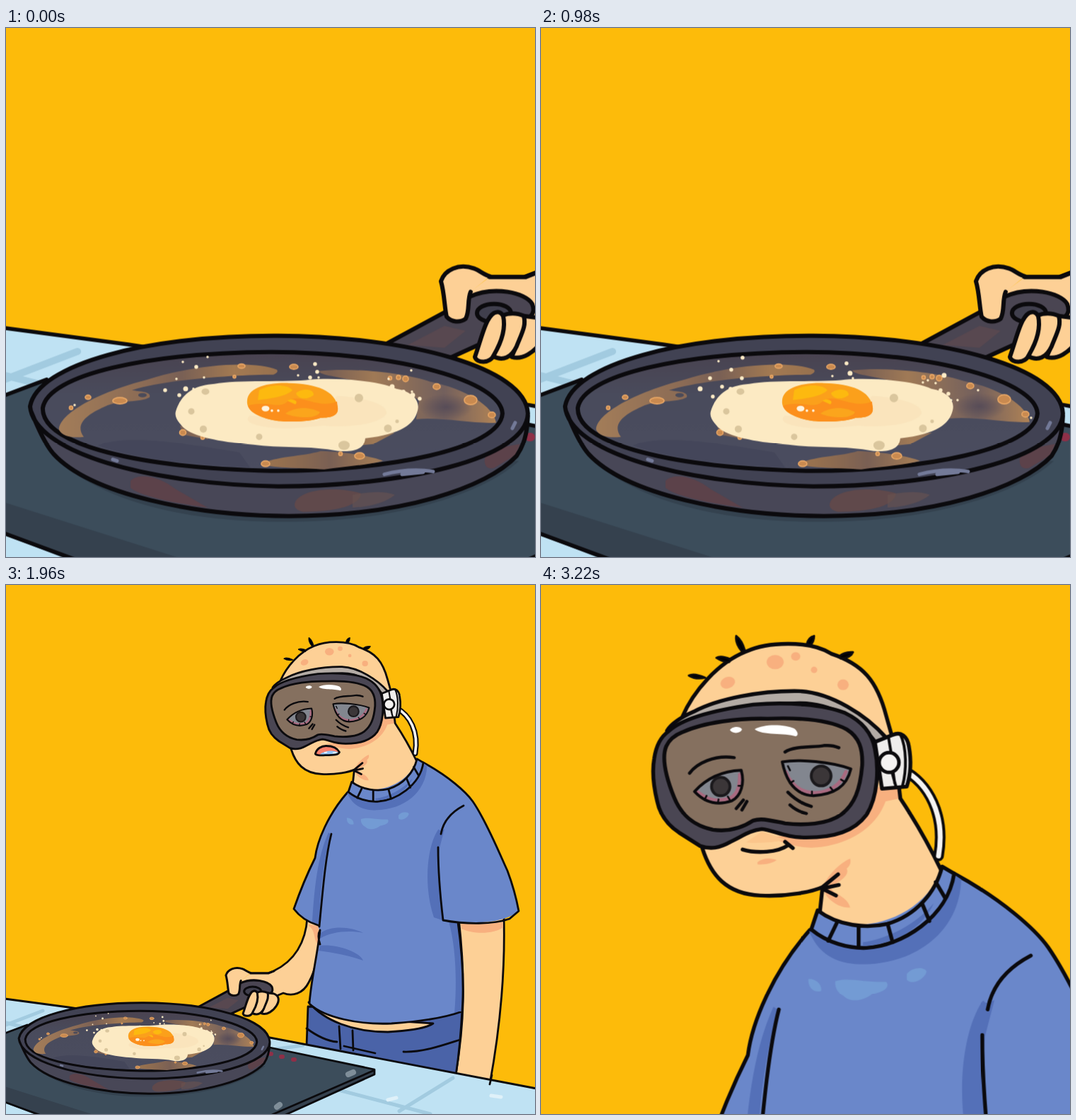
An HTML page for the animation above (4340 ms loop, 748 by 748 pixels).

```html
<!DOCTYPE html>
<html lang="en">
<head>
<meta charset="utf-8">
<title>Frying an egg in goggles</title>
<style>
@property --boil { syntax: "<number>"; inherits: true; initial-value: 0; }
@property --look { syntax: "<number>"; inherits: true; initial-value: 0; }
@property --smile { syntax: "<number>"; inherits: true; initial-value: 0; }
html, body { margin: 0; width: 100%; height: 100%; overflow: hidden; background: #fdbb0a; }
svg { display: block; width: 100vw; height: 100vh; }
path, ellipse, circle { stroke-linecap: round; stroke-linejoin: round; }

/* camera: pan, whole room, face */
#world { animation: camera 4340ms step-end infinite, boil 4340ms step-end infinite,
  look 4340ms step-end infinite, smile 4340ms step-end infinite; }
@keyframes camera {
  0% { transform: matrix(1.984, 0, 0, 1.984, -2, -737); }
  32.258% { transform: none; }
  64.516%, 100% { transform: matrix(1.905, 0, 0, 1.905, -540, -70.4); }
}
@keyframes boil {
  0%, 6.451%, 12.903%, 19.354%, 25.806%, 32.258%, 45.161% { --boil: 0; }
  3.225%, 9.677%, 16.129%, 22.58%, 29.032%, 35.483%, 58.064%, 100% { --boil: 1; }
}
@keyframes look { 0% { --look: 0; } 45.161%, 100% { --look: 1; } }
@keyframes smile { 0% { --smile: 0; } 74.193%, 100% { --smile: 1; } }

#pan { transform: translate(1px, 371.5px) scale(.504); }
#face { transform: translate(283.5px, 36.95px) scale(.525); }
.boilA { opacity: calc(1 - var(--boil)); }
.boilB { opacity: var(--boil); }
.talk { opacity: calc(1 - var(--smile)); }
.grin { opacity: var(--smile); }
.oilL { transform: translate(calc(var(--boil) * 3px), 0); }
.oilR { transform: translate(calc(var(--boil) * -2px), calc(var(--boil) * -1px)); }
.eyeL { transform: translate(calc((var(--look) - 1) * 8px), calc((1 - var(--look)) * 1px)); }
.eyeR { transform: translate(calc((var(--look) - 1) * 13px), calc((1 - var(--look)) * 1px)); }

.ink { stroke: #0b0a0d; }
.line { stroke: #0b0a0d; fill: none; }
.skin { fill: #fdd096; }
.blush { fill: #f8b07f; }
.shirt { fill: #6a87ca; }
.shade { fill: #5470b8; }
.steel { fill: #484757; }
.oil { fill: url(#oilFill); }
.ring { fill: #c98a50; stroke: #eaa866; stroke-width: 1.6; }
.spark { fill: none; stroke: #fdebc6; }
</style>
</head>
<body>
<svg viewBox="0 0 748 748" preserveAspectRatio="none">
<defs>
  <linearGradient id="oilFill" gradientUnits="userSpaceOnUse" x1="75" x2="693" y1="0" y2="0">
    <stop offset="0" stop-color="#a37d59"/><stop offset=".2" stop-color="#8b6b55"/>
    <stop offset=".28" stop-color="#796055"/><stop offset=".4" stop-color="#a37a52"/>
    <stop offset=".5" stop-color="#97714f"/><stop offset=".62" stop-color="#7a6054"/>
    <stop offset=".72" stop-color="#a07a56"/><stop offset=".88" stop-color="#73605d"/>
    <stop offset="1" stop-color="#b08356"/>
  </linearGradient>
  <radialGradient id="haze"><stop stop-color="#584d58"/><stop offset="1" stop-color="#584d58" stop-opacity="0"/></radialGradient>
  <linearGradient id="wall" x1="0" x2="0" y1="0" y2="1">
    <stop offset="0" stop-color="#4a4350"/><stop offset=".35" stop-color="#494b5c"/><stop offset="1" stop-color="#4b4d60"/>
  </linearGradient>
</defs>
<path fill="#fdbb0a" d="M0 0H748V748H0Z"/>
<g id="world">

  <!-- body -->
  <g stroke-width="2.8">
    <path class="skin ink" d="M640 470H704C706 550 698 630 684 706L636 692C648 620 650 560 640 470Z"/>
    <path class="blush" d="M643 477H703V484C690 494 660 494 644 486Z"/>
    <path class="skin ink" d="M345 549H370L378 546C408 532 424 505 426 470L446 470C443 520 438 545 428 562C420 578 405 582 392 577L380 582"/>
    <path class="blush" d="M428 480L442 482 441 508C434 500 438 488 428 482Z"/>
    <path class="ink" fill="#4a63a8" d="M427 596L425 652 636 694C641 660 643 640 645 600Z"/>
    <path class="skin ink" d="M428 590C450 616 490 632 540 632C575 630 595 626 604 620L545 616Z"/>
    <path class="line" d="M471 624L473 656M490 630L491 658M425 627C440 638 455 645 468 646M478 652L522 662M562 660C590 661 620 650 642 643"/>
    <path class="shirt" d="M483 293C455 325 440 362 437 386C425 410 415 435 407 458C416 470 428 477 441 481L444 492C441 520 431 560 429 592C450 612 500 622 545 620C590 617 620 612 645 603C648 560 645 520 639 477C680 479 705 475 725 462C722 445 715 420 709 404C700 385 680 335 660 306C650 292 625 270 590 251Z"/>
    <path class="shade" d="M456 350C440 385 436 430 433 477L443 482C444 430 449 390 459 352ZM620 345C610 350 614 344 611 346C595 370 590 425 605 470L620 475C613 440 611 400 613 372ZM626 476C636 510 638 560 634 606L645 603C648 560 645 520 639 477ZM444 493C460 480 490 484 505 492C485 488 460 490 444 500ZM444 510C465 507 500 518 505 531C485 524 465 520 442 517Z"/>
    <path class="line" d="M483 293C455 325 440 362 437 386C425 410 415 435 407 458C416 470 428 477 441 481M444 488C441 520 431 560 429 592C450 612 500 622 545 620C590 617 620 612 645 603C648 560 645 520 639 477M590 251C625 270 650 292 660 306C680 335 700 385 709 404C715 420 722 445 725 461L712 472C690 480 650 480 618 474C614 440 611 400 611 371M647 312C628 322 618 335 615 352M460 352C452 383 448 430 443 483M444 488C440 495 442 502 444 508"/>
  </g>

  <!-- head -->
  <g id="face" stroke-width="5.4">
    <path class="shade" d="M379 489C395 530 430 537 460 536C530 534 592 490 594 416L582 408C570 480 460 530 379 489Z"/>
    <path fill="#739bd4" d="M378 557C388 556 398 565 396 574C386 577 377 570 378 557ZM416 560C435 554 455 562 488 561C494 568 485 576 468 578C455 589 436 590 428 581C420 577 415 570 416 560ZM517 550C524 540 542 539 545 546C544 556 525 567 517 558Z"/>
    <path class="skin" d="M199 190C215 150 250 110 290 94C320 80 380 78 410 97C455 112 475 135 488 185L508 300C530 335 552 375 566 402C540 475 440 500 394 464L396 428C385 433 350 441 310 439C262 437 240 410 228 370Z"/>
    <path class="blush" d="M322 357C345 364 362 373 390 371C440 366 475 340 487 306L506 302 504 286 476 286 440 346ZM437 387C422 393 404 412 398 428L404 440C415 452 425 456 437 456C435 446 425 440 414 434L408 426C428 418 436 408 432 401C438 396 438 391 437 387Z"/>
    <g class="blush">
      <ellipse cx="331" cy="109" rx="12" ry="10"/><ellipse cx="360" cy="101" rx="6.5" ry="6"/>
      <circle cx="386" cy="120" r="4.5"/><ellipse cx="427" cy="141" rx="8" ry="7.5"/>
      <ellipse cx="264" cy="138" rx="10.5" ry="8" transform="rotate(-20 264 138)"/>
    </g>
    <path class="line" d="M199 188C215 150 250 110 290 94C320 80 380 78 410 97C455 112 475 135 488 185L495 210M506 285L508 302C530 335 552 375 565 402M228 372C240 410 262 437 310 439C350 441 385 433 398 427L394 464M398 427L420 409M398 429L421 424M399 430L417 439"/>
    <path class="ink" stroke-width="3" d="M232 131Q216 124 209 128Q219 134 232 131ZM268 105Q254 99 248 103Q257 109 266 109ZM284 94Q274 82 276 72Q284 78 288 92ZM376 83Q378 74 386 72Q386 80 381 85ZM421 101Q429 94 441 95Q438 103 424 104Z"/>
    <path class="ink" fill="#b3aba5" d="M178 206C185 195 200 186 216 179C250 161 310 149 365 150C410 152 460 184 488 216L474 224C450 190 410 167 365 167C300 168 230 182 178 206Z"/>
    <path class="line" stroke-width="15" d="M511 261C548 280 572 325 562 383"/>
    <path fill="none" stroke="#f5f3f2" stroke-width="7" d="M511 261C548 280 572 325 562 383"/>
    <path class="ink" fill="#efedec" d="M472 222L497 212C509 206 518 215 520 228C524 250 522 270 517 285L482 288Z"/>
    <path class="line" stroke-width="4" d="M491 214L495 238M496 264L502 286M508 211C517 230 517 262 511 284M498 266L500 280"/>
    <path class="ink" fill="#4a4653" d="M180 207C200 188 250 176 300 169C350 165 400 169 430 181C455 193 468 210 472 232C478 260 476 300 460 325C443 348 415 357 375 357C345 357 330 347 312 345C295 347 285 355 268 363C252 372 240 374 225 369L195 350C180 340 168 325 164 305C158 280 157 262 160 245C163 225 170 214 180 207Z"/>
    <path class="ink" fill="#85705f" d="M200 208C230 194 280 188 320 189C370 187 410 192 432 204C450 215 455 232 454 255C451 290 443 310 425 324C405 339 370 340 345 337C325 333 312 329 300 333C285 343 265 349 243 346C215 340 198 325 188 300C178 275 170 245 177 228C182 217 190 212 200 208Z"/>
    <circle class="ink" cx="492" cy="251" r="14" fill="#f5f3f2" stroke-width="5"/>
    <path fill="#fff" d="M267 205C270 200 281 199 284 204C283 210 270 211 267 205ZM302 204C315 196 345 197 358 203C364 208 364 213 360 214C345 209 312 213 302 204Z"/>
    <path class="line" stroke-width="4.5" d="M210 266C220 252 245 240 273 244M345 236C358 227 385 230 400 227Q412 226 421 230M276 316L286 304M284 318L291 306M349 293Q364 308 382 313M352 311Q362 320 375 323"/>
    <path fill="#82868f" d="M217 292C235 272 258 263 283 262C288 280 283 298 270 305C250 312 232 308 217 292ZM341 250C365 246 410 250 438 260C432 285 415 296 385 298C365 297 348 285 341 250Z"/>
    <path fill="none" stroke="#a96a80" stroke-width="5" d="M222 293C238 306 255 306 268 301C279 295 281 282 281 268M346 264C354 285 368 293 386 294C408 293 423 284 431 264"/>
    <path class="line" stroke-width="2.5" d="M231 304L234 298M250 308L251 303M267 304L264 299M284 284H279M352 280L357 277M383 297V292M413 291L409 286M429 278L424 275M349 256L352 262"/>
    <path class="line" stroke-width="4" d="M217 292C235 272 258 263 283 262C288 280 283 298 270 305C250 312 232 308 217 292ZM341 250C365 246 410 250 438 260C432 285 415 296 385 298C365 297 348 285 341 250Z"/>
    <g fill="#3b3638" stroke="#1b191c" stroke-width="4">
      <circle class="eyeL" cx="254" cy="285" r="13"/><circle class="eyeR" cx="396" cy="270" r="14"/>
    </g>
    <g class="talk">
      <path fill="#f9806c" d="M293 384C297 370 310 363 322 363C340 363 352 368 358 380C355 387 345 388 320 388C305 389 293 388 293 384Z"/>
      <path fill="#8fc3f6" d="M305 386C320 374 345 374 356 381L350 387 310 388Z"/>
      <path stroke="#fff" stroke-width="3" d="M318 381L324 380M341 382L349 381"/>
      <path class="line" d="M293 384C297 370 310 363 322 363C340 363 352 368 358 380C355 387 345 388 320 388C305 389 293 388 293 384Z"/>
    </g>
    <g class="grin">
      <path fill="#fbc58b" d="M290 364L312 349 346 360Q320 366 290 364Z"/>
      <path class="line" d="M285 374C305 380 335 378 349 368M345 363L356 372"/>
      <path class="blush" d="M306 392C315 385 325 386 333 389C328 393 316 396 306 395Z"/>
    </g>
    <path class="shirt ink" d="M391 460C420 482 460 486 490 479C530 467 558 435 567 398L584 408C575 470 510 510 460 513C435 514 405 506 382 487Z"/>
    <path class="shade" d="M455 505C490 500 530 480 555 450C540 485 500 508 455 510Z"/>
    <path class="line" d="M418 478L406 503M449 483V511M490 479L497 505M539 451L549 475M558 420L571 442"/>
  </g>

  <!-- counter and hob -->
  <g stroke-width="2.8">
    <path fill="#bfe2f3" d="M-2 585L88 597 373 640 750 712V760H-2Z"/>
    <path fill="none" stroke="#a2cbe0" stroke-width="5" d="M0 622L52 602M0 619L28 626M376 657L420 651M470 714L600 748M556 744L632 697"/>
    <path fill="none" stroke="#dff1f9" stroke-width="5" d="M540 728L552 725M686 722L700 724"/>
    <path class="line" d="M-2 585L88 597 373 640 750 712M687 693L684 706"/>
    <path fill="#3c4d5b" d="M-2 634L30 622 180 630 373 654 521 685V692L380 756H60L-2 732Z"/>
    <path fill="#35414e" d="M-2 709L146 756H66L-2 732ZM521 686L358 756H380L521 692Z"/>
    <path class="line" d="M-2 634L30 622M373 654L521 685V692L380 756M521 686L360 756M-2 731L66 756"/>
    <path fill="none" stroke="#7f8e99" stroke-width="8" d="M484 692L491 689M383 738L387 735"/>
    <path fill="none" stroke="#8e3048" stroke-width="6" d="M374 663H375M389 667H391M406 671H408"/>
  </g>

  <!-- pan, egg and hand -->
  <g id="pan" stroke-width="6">
    <path fill="#34424f" d="M75 612C150 680 290 700 400 698C560 698 680 655 725 612Z"/>
    <path class="skin" d="M652 376L684 352H750V395H690Z"/>
    <path class="line" d="M684 352H735L750 346"/>
    <path class="ink" fill="#4a4552" d="M535 448L622 401 655 380C690 364 735 374 744 390C750 405 740 412 725 412L705 420 670 447 624 468Z"/>
    <path fill="#584850" d="M568 448L620 421 650 428 620 452Z"/>
    <ellipse class="ink" cx="690" cy="403" rx="24" ry="13" fill="#403f4d"/>
    <path class="skin ink" d="M684 351C676 349 670 343 662 340C640 332 620 342 615 358C620 375 620 395 623 408C630 416 642 417 650 411C656 400 652 385 657 373"/>
    <path class="skin ink" d="M732 407C730 430 722 450 715 465C730 470 748 458 757 443C765 430 766 415 748 409Z"/>
    <path class="skin ink" d="M703 406C700 430 690 450 689 464C703 472 715 465 722 450C730 430 736 420 732 407C722 402 710 403 703 406Z"/>
    <path class="skin ink" d="M690 403C678 410 672 440 663 465C665 474 685 475 690 462C700 445 707 425 703 407C699 400 694 401 690 403Z"/>
    <path class="steel" d="M34 535C45 475 200 434 385 435C570 436 735 480 738 545C738 575 732 590 722 605C680 650 560 690 400 690C270 690 120 660 67 602C50 585 36 560 34 535Z"/>
    <path fill="#5c424a" d="M176 640C190 627 220 636 240 652L285 678C240 672 190 662 176 650ZM677 608C690 592 718 590 727 588L720 604 690 622C678 625 676 616 677 608Z"/>
    <path fill="#60494b" d="M410 668C425 648 480 650 502 658C500 675 470 684 420 684C408 682 406 675 410 668Z"/>
    <path fill="#6a5450" opacity=".6" d="M490 660Q530 652 550 660Q530 676 490 678Z"/>
    <path fill="#414253" d="M34 535C45 475 200 434 385 435C570 436 735 480 738 545C736 610 560 648 385 648C200 645 40 600 34 535Z"/>
    <path class="line" d="M34 535C45 475 200 434 385 435C570 436 735 480 738 545C736 610 560 648 385 648C200 645 40 600 34 535ZM35 541C45 565 55 588 67 602C120 660 270 690 400 690C560 690 680 650 722 605C732 590 737 575 738 548"/>
    <path fill="none" stroke="#737a98" stroke-width="5" d="M535 631Q570 622 604 627M560 631L590 628M151 610L157 612M716 566L720 558"/>
    <path class="ink" fill="url(#wall)" d="M52 537C60 490 200 459 375 458C560 459 700 500 702 545C698 595 540 627 375 626C190 622 50 590 52 537Z"/>
    <path fill="#44465a" d="M130 590C170 575 240 585 330 600L345 621C260 618 180 608 130 590Z"/>

    <g class="oilL">
      <path class="oil" d="M383 483C350 470 270 475 200 497C130 515 75 545 75 568C80 578 95 580 110 578C98 562 110 548 140 535C160 525 190 530 203 522C206 514 190 514 178 512C230 496 330 490 378 490Q386 487 383 483ZM360 617C380 605 420 606 445 598C480 599 520 606 533 612C510 618 480 620 450 624C420 622 380 622 360 617ZM246 562L250 575 285 581 300 572ZM490 578L550 572 520 588 500 590Z"/>
      <g class="ring">
        <ellipse cx="333" cy="478" rx="5" ry="3"/><ellipse cx="407" cy="479" rx="6" ry="3.5"/>
        <ellipse cx="161" cy="527" rx="10" ry="4.5"/><ellipse cx="116" cy="522" rx="4" ry="3"/>
        <circle cx="92" cy="537" r="2.5"/><circle cx="323" cy="493" r="2"/>
        <ellipse cx="500" cy="605" rx="7" ry="4.5"/><circle cx="473" cy="602" r="2.5"/>
        <ellipse cx="367" cy="616" rx="6" ry="4"/><ellipse cx="250" cy="572" rx="4.5" ry="4"/>
        <circle cx="278" cy="579" r="2.5"/>
      </g>
      <ellipse cx="193" cy="519" rx="6" ry="3" fill="#4b4b5a"/>
    </g>
    <g class="oilR">
      <path class="oil" d="M442 485C490 480 560 487 600 500C650 510 690 535 693 558C660 560 620 550 580 553L584 526C560 510 520 504 490 498C470 493 445 491 442 485Z"/>
      <ellipse cx="622" cy="536" rx="38" ry="19" fill="url(#haze)"/>
      <g class="ring">
        <circle cx="543" cy="495" r="2.5"/><circle cx="555" cy="494" r="3"/><circle cx="565" cy="496" r="4"/>
        <ellipse cx="609" cy="507" rx="5" ry="4"/><ellipse cx="657" cy="526" rx="9" ry="6.5"/>
        <ellipse cx="687" cy="547" rx="5" ry="4"/>
      </g>
    </g>

    <path fill="#fceac3" d="M240 542C248 517 265 505 295 503C325 497 400 501 430 497C470 494 530 499 552 510C575 514 586 527 582 541C577 560 560 574 508 580C507 596 490 600 470 598C430 590 385 594 350 589C310 586 265 579 250 564C243 556 238 550 240 542Z"/>
    <path fill="#fae0b5" d="M468 520C500 522 540 530 538 545C530 560 480 566 450 562L400 566C370 566 330 560 345 548L440 556Z" opacity=".5"/>
    <g fill="#dac69d">
      <circle cx="262" cy="542" r="4.5"/><ellipse cx="282" cy="514" rx="5.5" ry="4.5"/><circle cx="279" cy="567" r="5"/>
      <circle cx="358" cy="578" r="4.5"/><ellipse cx="478" cy="590" rx="8" ry="6.5"/><circle cx="499" cy="523" r="6"/>
      <circle cx="540" cy="566" r="5.5"/><circle cx="553" cy="556" r="2.5"/>
    </g>
    <path fill="#fba01b" d="M341 527C342 510 365 501 400 502C440 503 466 513 469 536C471 548 460 551 445 551C430 557 390 559 368 552C350 546 340 538 341 527Z"/>
    <path fill="#fc8f1c" d="M342 534C370 526 385 540 398 528C415 514 440 540 468 528L469 536C471 548 460 551 445 551C430 557 390 559 368 552C352 547 344 541 342 534Z"/>
    <path fill="#fdb90f" d="M358 512C375 502 400 504 405 512C395 522 370 524 356 526ZM410 516C420 508 436 510 435 519C425 527 412 524 410 516ZM398 527C405 522 415 528 409 532Z"/>
    <path fill="#fba51c" d="M395 545C410 534 432 536 444 543C440 553 410 552 395 545Z"/>
    <g fill="#fff3dc"><ellipse cx="367" cy="538" rx="5.5" ry="4"/><circle cx="376" cy="541" r="1.8"/><circle cx="385" cy="541" r="1.8"/></g>

    <g class="spark boilA">
      <path stroke-width="3.5" d="M250 472h0M285 465h0M241 496h0M280 494h0M265 510h0M413 491h0M573 484h0M541 496h0M574 514h0M442 494h0M97 533h0"/>
      <path stroke-width="5.5" d="M269 479h0M225 512h0M245 519h0M437 475h0M440 486h0M430 494h0M562 514h0M585 524h0"/>
      <path stroke-width="7" d="M254 510h0M546 507h0M575 519h0"/>
    </g>
    <g class="spark boilB">
      <path stroke-width="3.5" d="M251 471h0M412 492h0M441 495h0M540 501h0M547 498h0M558 502h0M580 526h0M589 526h0M618 512h0M693 551h0"/>
      <path stroke-width="5.5" d="M285 466h0M269 483h0M239 495h0M284 495h0M256 507h0M268 510h0M243 521h0M432 474h0M565 512h0M576 517h0"/>
      <path stroke-width="7" d="M225 510h0M437 488h0M570 491h0"/>
    </g>
  </g>
</g>
</svg>
</body>
</html>
```
